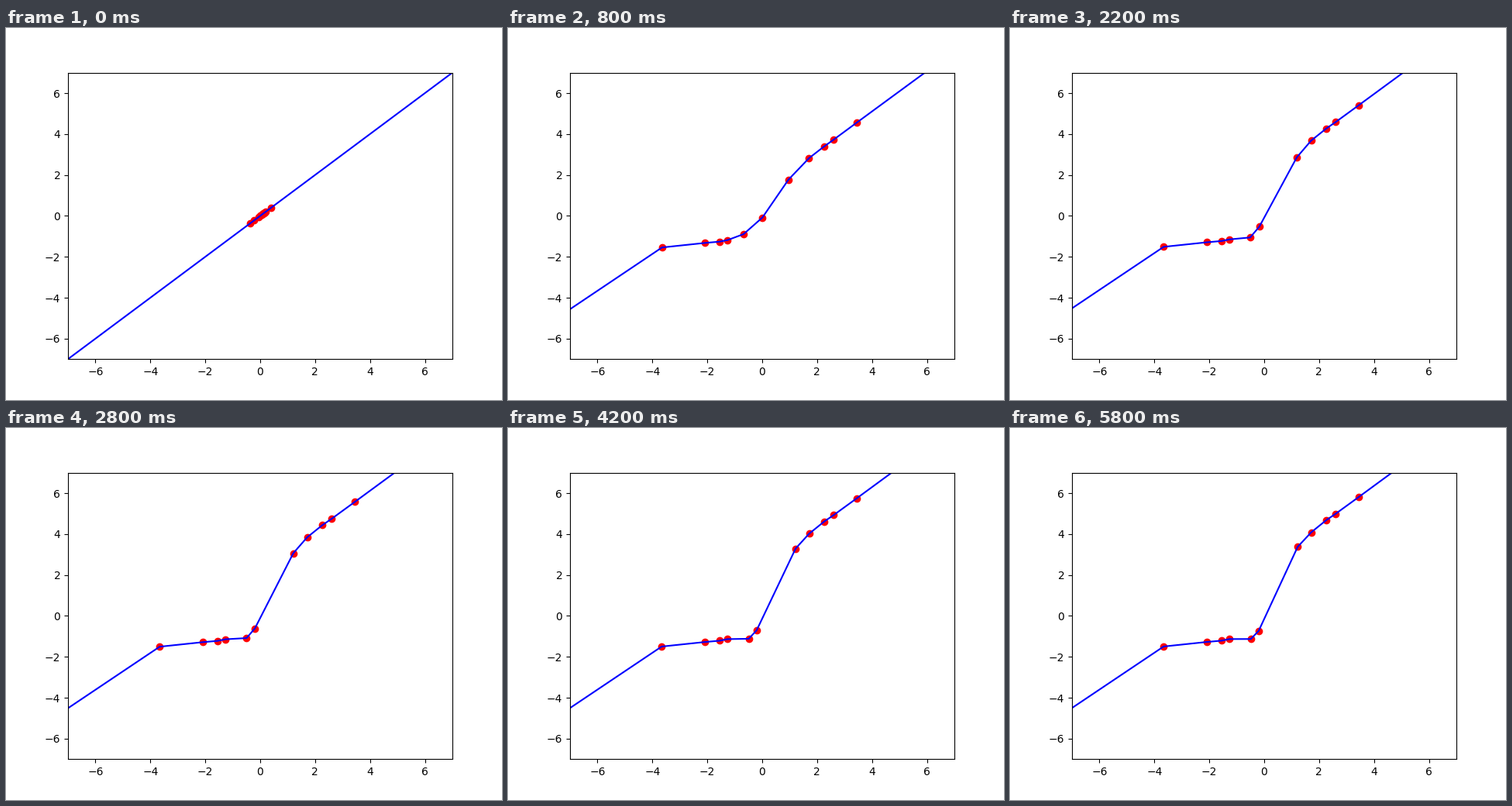
Write a matplotlib script that moves like this. It is 640 px wide and 480 px high and loops after 6000 ms.

```python
import numpy as np
import matplotlib.pyplot as plt
from matplotlib.animation import FuncAnimation

FRAMES, INTERVAL = 30, 200
LIM = 7
FAST, DRIFT, SLOW = 0.25, 0.74, 0.855  # share of the way left after each step
LEFT_SLOPE, RIGHT_SLOPE = 0.9, 0.985

# Knots start close together on the diagonal and settle on a bent curve
START = np.array([-0.36, -0.217, -0.056, 0, 0.056, 0.085,
                  0.113, 0.141, 0.17, 0.186, 0.404])
END_X, END_Y = np.array([
    (-3.661, -1.496), (-2.083, -1.273), (-1.558, -1.212), (-1.264, -1.133),
    (-0.488, -1.136), (-0.203, -0.75), (1.219, 3.405), (1.71, 4.106),
    (2.261, 4.705), (2.602, 5.015), (3.446, 5.837)]).T

# The bend drifts sideways; the upper half rises slowly from the diagonal
LAG_X = np.zeros(len(START))
LAG_X[4:7] = -0.65, 0.7, -0.87
LAG_Y = END_X + LAG_X - END_Y
LAG_Y[:4] = -0.1
LAG_Y[4] = 0.45


def settle(step, end, lag, rate):
    """Jump quickly towards the end, then close the lag at its own rate."""
    return end + (START - end - lag) * FAST ** step + lag * rate ** step


def knots(step):
    return (settle(step, END_X, LAG_X, DRIFT),
            settle(step, END_Y, LAG_Y, SLOW))


def with_tails(x, y, step):
    bend = 1 - FAST ** step
    left = 1 + (LEFT_SLOPE - 1) * bend
    right = 1 + (RIGHT_SLOPE - 1) * bend
    xs = np.concatenate([[-LIM], x, [LIM]])
    ys = np.concatenate([[y[0] - left * (x[0] + LIM)], y,
                         [y[-1] + right * (LIM - x[-1])]])
    return xs, ys


fig, ax = plt.subplots(figsize=(6.4, 4.8), dpi=100)
ax.set_xlim(-LIM, LIM)
ax.set_ylim(-LIM, LIM)
dots = ax.scatter(*knots(0), color="red")
line, = ax.plot([], [], color="blue")


def update(step):
    x, y = knots(step)
    dots.set_offsets(np.column_stack([x, y]))
    line.set_data(*with_tails(x, y, step))
    return dots, line


anim = FuncAnimation(fig, update, frames=FRAMES, interval=INTERVAL,
                     repeat=True, repeat_delay=0)
plt.show()
```
